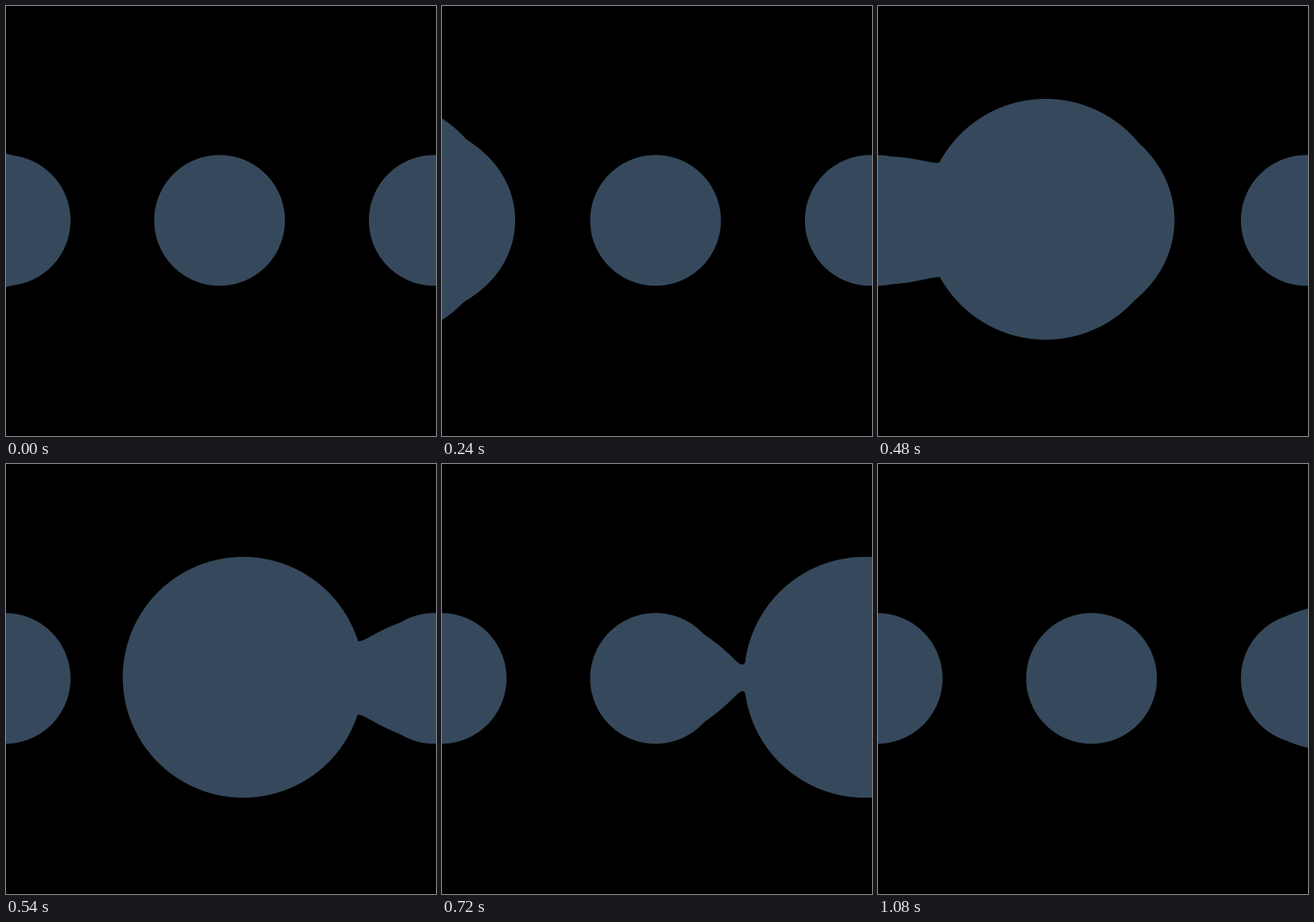
These frames come from a looping animation (500x500 px, 1140 ms). An HTML page with a canvas:

```html
<!DOCTYPE html>
<html lang="en">
<head>
<meta charset="utf-8">
<title>Metaball loader</title>
<style>
  html, body { margin: 0; width: 100%; height: 100%; overflow: hidden; background: #000; }
  canvas { display: block; width: 500px; height: 500px; }
</style>
</head>
<body>
<canvas id="stage" width="500" height="500"></canvas>
<script>
const SIZE = 500, LOOP = 1140, STEP = 60, TRAVEL = 1060;
const COLOR = [54, 73, 92];
const ctx = document.getElementById('stage').getContext('2d');
const image = ctx.createImageData(SIZE, SIZE);

// reach: how far past its edge a ball attracts its neighbours
const dots = [
  { x: -1, y: 249.3, r: 76, reach: 23 },
  { x: 248.3, y: 249.3, r: 76, reach: 30 },
  { x: 498, y: 249.3, r: 76, reach: 23 }
];
const mover = { x: 0, y: 248, r: 140, reach: 55 };

// Field strength is 1 on the edge of a lone ball and fades to 0 at its reach.
function addBall(field, ball) {
  const limit = ball.r + ball.reach;
  const x0 = Math.max(0, Math.floor(ball.x - limit));
  const x1 = Math.min(SIZE, Math.ceil(ball.x + limit));
  for (let y = 0; y < SIZE; y++) {
    const dy = y + 0.5 - ball.y;
    if (Math.abs(dy) >= limit) continue;
    for (let x = x0; x < x1; x++) {
      const dx = x + 0.5 - ball.x;
      const left = limit - Math.sqrt(dx * dx + dy * dy);
      if (left > 0) field[y * SIZE + x] += Math.pow(left / ball.reach, 1.3);
    }
  }
}

function ease(u) {
  let lo = 0, hi = 1;
  for (let i = 0; i < 30; i++) {
    const s = (lo + hi) / 2, q = 1 - s;
    const x = 3 * 0.405 * s * q * q + 3 * 0.558 * s * s * q + s * s * s;
    if (x < u) lo = s; else hi = s;
  }
  return lo * lo * (3 - 2 * lo);
}

const still = new Float32Array(SIZE * SIZE);
dots.forEach(dot => addBall(still, dot));
const field = new Float32Array(SIZE * SIZE);

function draw(time) {
  mover.x = -170 + 825 * ease(Math.min(1, time / TRAVEL));
  field.set(still);
  addBall(field, mover);
  const data = image.data;
  for (let y = 0, i = 0; y < SIZE; y++) {
    for (let x = 0; x < SIZE; x++, i++) {
      const f = field[i];
      let cover = f > 1 ? 1 : 0;
      if (Math.abs(f - 1) < 0.1) {
        // soften the contour over one pixel
        const gx = field[x < SIZE - 1 ? i + 1 : i - 1] - f;
        const gy = field[y < SIZE - 1 ? i + SIZE : i - SIZE] - f;
        const slope = Math.hypot(gx, gy) || 1e-6;
        cover = Math.min(1, Math.max(0, (f - 1) / slope + 0.5));
      }
      for (let c = 0; c < 3; c++) data[i * 4 + c] = COLOR[c] * cover;
      data[i * 4 + 3] = 255;
    }
  }
  ctx.putImageData(image, 0, 0);
}

const start = performance.now();
let shown = -1;
function tick() {
  const time = (performance.now() - start) % LOOP;
  const step = Math.floor(time / STEP);
  if (step !== shown) {
    shown = step;
    draw(step * STEP);
  }
  requestAnimationFrame(tick);
}
tick();
</script>
</body>
</html>
```
